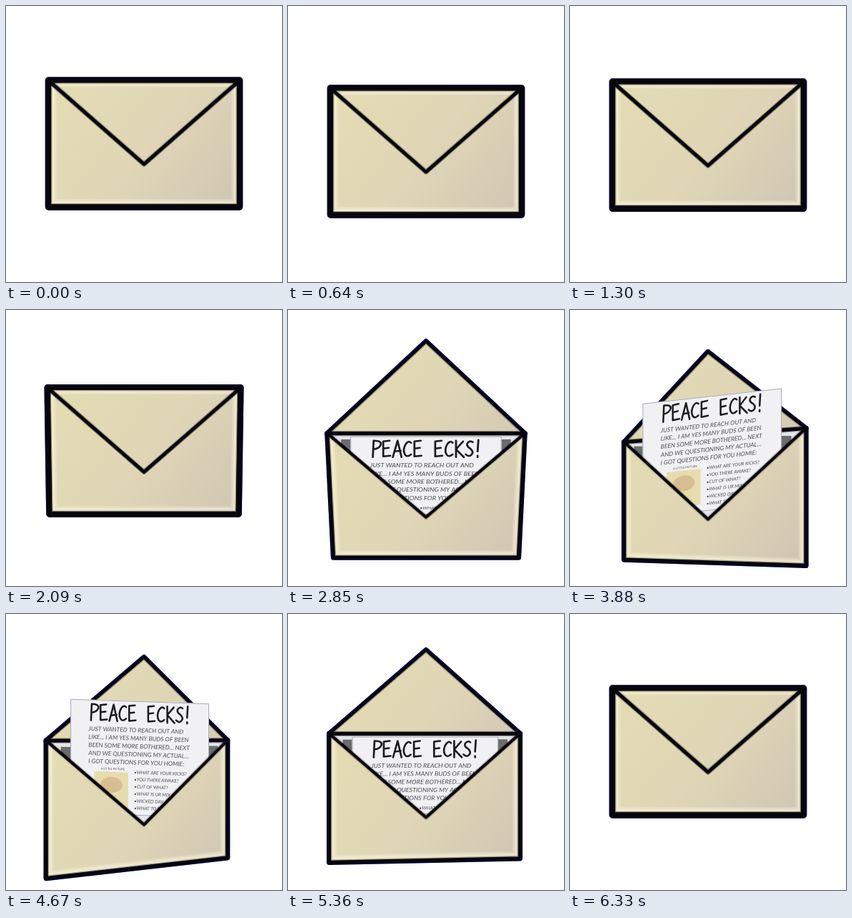
These frames come from a looping animation (386x386 px, 6.36 s). An HTML page with a canvas:

```html
<!DOCTYPE html>
<html lang="en">
<head>
<meta charset="utf-8">
<title>Envelope</title>
<style>
html, body { margin: 0; width: 100%; height: 100%; overflow: hidden; background: #fff; }
canvas { display: block; width: 386px; height: 386px; }
</style>
</head>
<body>
<canvas id="stage" width="386" height="386" role="img" aria-label="Envelope with a letter: PEACE ECKS!"></canvas>
<script>
const ctx = document.getElementById('stage').getContext('2d');
const LOOP = 6360, STEP = 30, BOB = LOOP / 6;
const CX = 193, HALF_W = 133.5, HALF_H = 88.5, DEPTH = 117, CAMERA = 560;
const LETTER_W = 205, PAGE_W = 192;

const GLYPHS = {
  P: 'M1 24L2 1Q13 1 11 7Q9 12 2 13',
  E: 'M9 1L1 2L1 23L10 22M1 12L8 11',
  A: 'M0 24L6 1L11 24M2 16L10 15',
  C: 'M10 4Q7 0 3 6Q-1 14 2 20Q5 25 10 20',
  K: 'M1 1L1 24M10 2L1 13L11 24',
  S: 'M9 3Q5 0 2 5Q1 9 6 12Q11 17 7 21Q4 24 0 20',
  '!': 'M3 0L2 16M2 22L2 24'
};
const TITLE = 'PEACE ECKS!';
const LINES = [
  'JUST WANTED TO REACH OUT AND',
  'LIKE... I AM YES MANY BUDS OF BEEN',
  'BEEN SOME MORE BOTHERED... NEXT',
  'AND WE QUESTIONING MY ACTUAL...',
  'I GOT QUESTIONS FOR YOU HOMIE:'
];
const BULLETS = ['WHAT ARE YOUR KICKS?', 'YOU THERE AWAKE?', 'CUT OF WHAT?', 'WHAT IS UR MIX', 'WICKED DAY', 'WHAT TO DO'];

const mix = (a, b, k) => a + (b - a) * k;
const part = (t, a, b) => Math.min(1, Math.max(0, (t - a) / (b - a)));
const rad = deg => deg * Math.PI / 180;

function ramp(t, a, b) {
  const k = part(t, a, b);
  return k * k * (3 - 2 * k);
}

// Everything that moves, as a function of time
function poseAt(t) {
  const open = ramp(t, 1900, 2850) - ramp(t, 5850, 6310);
  const turn = Math.sin(2 * Math.PI * part(t, 3100, 5400));
  return {
    open,
    cy: mix(192.5, 256, open) + 13 * Math.sin(Math.PI * t / BOB) ** 4,
    hinge: Math.PI * (ramp(t, 2050, 2900) - ramp(t, 5600, 6300)),
    lift: ramp(t, 2950, 3600) - ramp(t, 4700, 5260),
    yaw: rad(22) * turn,
    pitch: rad(12) * Math.sin(Math.PI * part(t, 1900, 3600)),
    skew: 0.02 * turn - 0.045 * Math.abs(turn)
  };
}

function project(pose, x, y, z = 0) {
  const { yaw, pitch, skew, cy } = pose;
  const x1 = x * Math.cos(yaw) - z * Math.sin(yaw);
  const z1 = z * Math.cos(yaw) + x * Math.sin(yaw);
  const y1 = y * Math.cos(pitch) + z1 * Math.sin(pitch);
  const z2 = z1 * Math.cos(pitch) - y * Math.sin(pitch);
  const s = CAMERA / (CAMERA - z2);
  return [CX + s * x1, cy + s * y1 + skew * x1];
}

function shape(points, closed = true) {
  const p = new Path2D();
  points.forEach(([x, y], i) => i ? p.lineTo(x, y) : p.moveTo(x, y));
  if (closed) p.closePath();
  return p;
}

function line(path, color, width) {
  ctx.strokeStyle = color;
  ctx.lineWidth = width;
  ctx.stroke(path);
}

function ink(path, width) {
  line(path, 'rgba(10,10,20,.3)', width + 2.5);
  line(path, '#06060c', width);
}

function rim(path, width) {
  line(path, '#00005c', width + 2.5);
}

function paper(top) {
  const g = ctx.createLinearGradient(70, top, 315, top + 190);
  g.addColorStop(0, '#e3dcb3');
  g.addColorStop(.5, '#e0d6b6');
  g.addColorStop(1, '#d0c5b3');
  return g;
}

function drawTitle() {
  [...TITLE].forEach((ch, i) => {
    if (!GLYPHS[ch]) return;
    ctx.save();
    ctx.translate(27.5 + i * 13.2, 5);
    line(new Path2D(GLYPHS[ch]), '#1b1b20', 2.5);
    ctx.restore();
  });
}

function drawLetter(pose) {
  const y = -HALF_H + 4 - 59 * pose.lift;
  const [x0, y0] = project(pose, -LETTER_W / 2, y);
  const [x1, y1] = project(pose, LETTER_W / 2, y);
  ctx.save();
  ctx.transform((x1 - x0) / PAGE_W, (y1 - y0) / PAGE_W, 0, 1, x0, y0);
  ctx.fillStyle = '#f1f1f4';
  ctx.fillRect(0, 0, PAGE_W, 160);
  ctx.strokeStyle = '#a9a9b8';
  ctx.lineWidth = 1;
  ctx.strokeRect(.5, .5, PAGE_W - 1, 159);
  drawTitle();

  ctx.fillStyle = '#4c4c52';
  ctx.textBaseline = 'middle';
  ctx.font = 'italic 8.4px Lato, "Open Sans", sans-serif';
  LINES.forEach((s, i) => ctx.fillText(s, 25, 41 + i * 11.3));
  ctx.font = 'italic 6.4px Lato, "Open Sans", sans-serif';
  BULLETS.forEach((s, i) => ctx.fillText('\u2022' + s, 88, 100 + i * 10));

  ctx.font = '4px Lato, sans-serif';
  ctx.fillText('A LITTLE PICTURE', 42, 96);
  ctx.fillStyle = '#e6dcae';
  ctx.fillRect(33, 100, 47, 50);
  ctx.fillStyle = '#d8bd92';
  ctx.beginPath();
  ctx.ellipse(57, 118, 15, 11, 0, 0, 7);
  ctx.fill();
  ctx.restore();
}

function drawInside(pose, tl, tr, v) {
  ctx.save();
  ctx.clip(shape([tl, tr, v]));
  ctx.fillStyle = '#e6e6ea';
  ctx.fillRect(0, 0, 386, 386);
  ctx.fillStyle = '#6c6c6b';
  for (const side of [-1, 1]) {
    const [x, y] = project(pose, side * (LETTER_W / 2 + 6), -HALF_H + 8);
    ctx.fillRect(x - 7, y, 14, 30);
  }
  ctx.restore();
}

function draw(t) {
  const pose = poseAt(t);
  const tl = project(pose, -HALF_W, -HALF_H), tr = project(pose, HALF_W, -HALF_H);
  const br = project(pose, HALF_W, HALF_H), bl = project(pose, -HALF_W, HALF_H);
  const v = project(pose, 0, DEPTH - HALF_H);
  const tip = project(pose, 0, DEPTH * Math.cos(pose.hinge) - HALF_H, DEPTH * Math.sin(pose.hinge));
  const top = (tl[1] + tr[1]) / 2;
  const raised = tip[1] < top;
  const edge = mix(7, 5, pose.open), fold = mix(4.5, 4, pose.open);

  ctx.fillStyle = '#fff';
  ctx.fillRect(0, 0, 386, 386);
  ctx.lineJoin = ctx.lineCap = 'round';

  const flap = shape([tl, tip, tr]);
  const body = shape([tl, tr, br, bl]);
  const front = shape([tl, v, tr, br, bl]);
  const sides = shape([tl, bl, br, tr], false);

  if (raised) {
    rim(flap, fold + 1);
    ctx.fillStyle = paper(top - DEPTH);
    ctx.fill(flap);
    ink(flap, fold);
  }
  rim(raised ? sides : body, edge);

  drawInside(pose, tl, tr, v);
  ink(shape([tl, tr], false), edge);
  drawLetter(pose);

  ctx.fillStyle = paper(top);
  ctx.fill(front);
  ctx.save();
  ctx.clip(front);
  for (const w of [15, 11, 8]) line(sides, 'rgba(248,244,220,.28)', edge + w);
  ctx.restore();
  ink(shape([tl, v, tr], false), fold);
  ink(sides, edge);

  if (!raised) {
    ctx.fillStyle = paper(top);
    ctx.fill(flap);
    ctx.save();
    ctx.clip(flap);
    line(shape([tl, tr], false), 'rgba(248,244,220,.45)', edge + 11);
    ctx.restore();
    ink(shape([tl, tip, tr], false), fold);
    ink(body, edge);
  }
}

const start = performance.now();
function frame() {
  const t = (performance.now() - start) % LOOP;
  draw(Math.floor(t / STEP) * STEP);
  requestAnimationFrame(frame);
}
frame();
</script>
</body>
</html>
```
